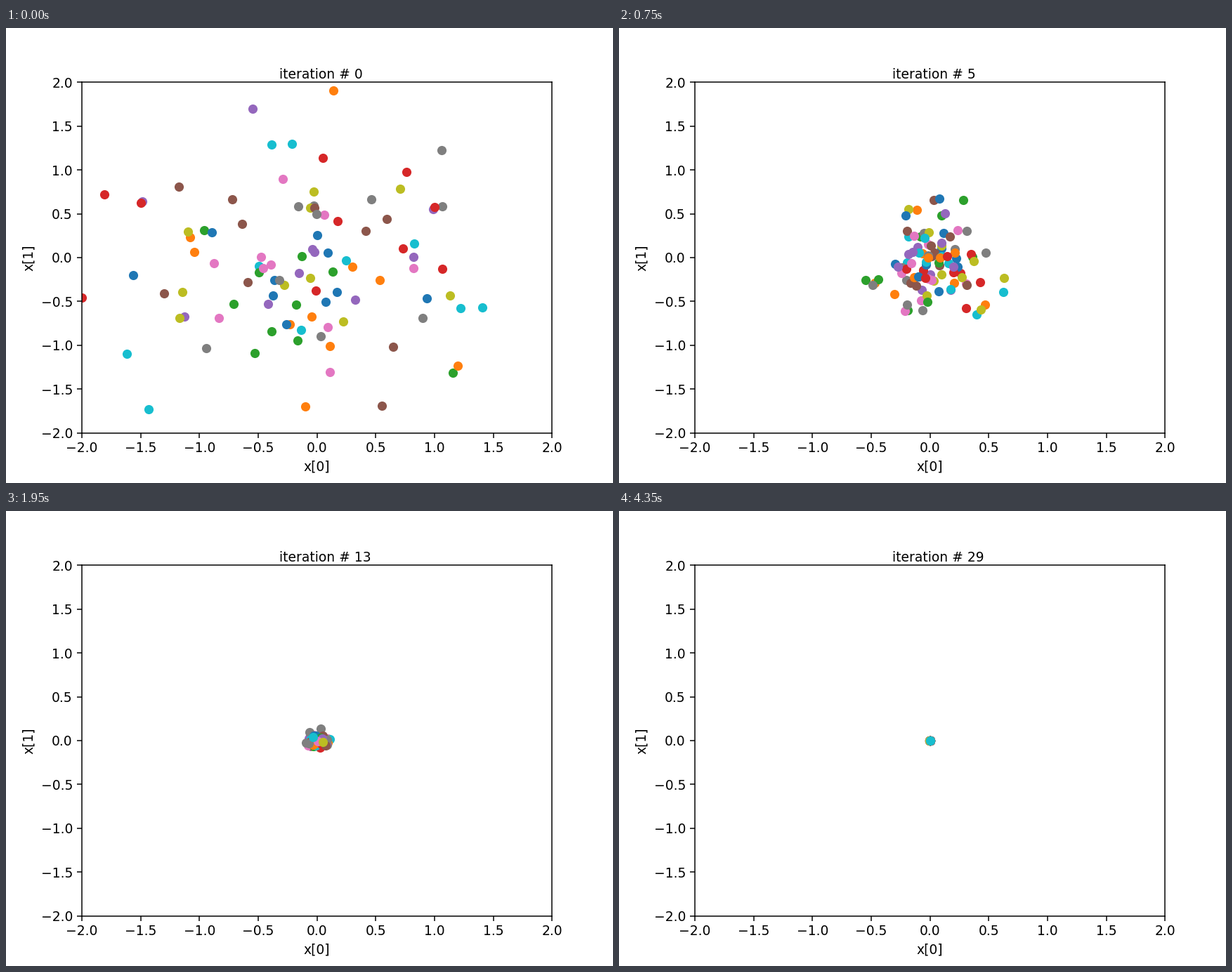
These frames come from a looping animation (864 by 648 pixels, 4500 ms). A matplotlib script:

```python
import numpy as np
import matplotlib.pyplot as plt
from matplotlib.animation import FuncAnimation

ITERATIONS = 30
POPULATION = 100
LIMIT = 2
START_SIGMA = 0.85
DECAY = 0.23


def sample_populations():
    """Draw a fresh cloud per iteration whose spread shrinks exponentially."""
    rng = np.random.default_rng(7)
    sigma = START_SIGMA * np.exp(-DECAY * np.arange(ITERATIONS))
    noise = rng.normal(size=(ITERATIONS, POPULATION, 2))
    return np.clip(sigma[:, None, None] * noise, -LIMIT, LIMIT)


populations = sample_populations()

fig, ax = plt.subplots(figsize=(6.4, 4.8), dpi=135)
fig.subplots_adjust(left=0.125, right=0.8995, bottom=0.11, top=0.8808)
ticks = np.arange(-LIMIT, LIMIT + 0.1, 0.5)
ax.set(xlim=(-LIMIT, LIMIT), ylim=(-LIMIT, LIMIT),
       xlabel="x[0]", ylabel="x[1]", xticks=ticks, yticks=ticks)
ax.tick_params(axis="x", pad=2.9)
title = ax.text(0.42, 1.01, "", transform=ax.transAxes)
dots = [ax.plot([], [], "o")[0] for _ in range(POPULATION)]


def update(iteration):
    title.set_text(f"iteration # {iteration}")
    for dot, (x, y) in zip(dots, populations[iteration]):
        dot.set_data([x], [y])
    return [title, *dots]


anim = FuncAnimation(fig, update, frames=ITERATIONS, interval=150, repeat=True)
plt.show()
```
